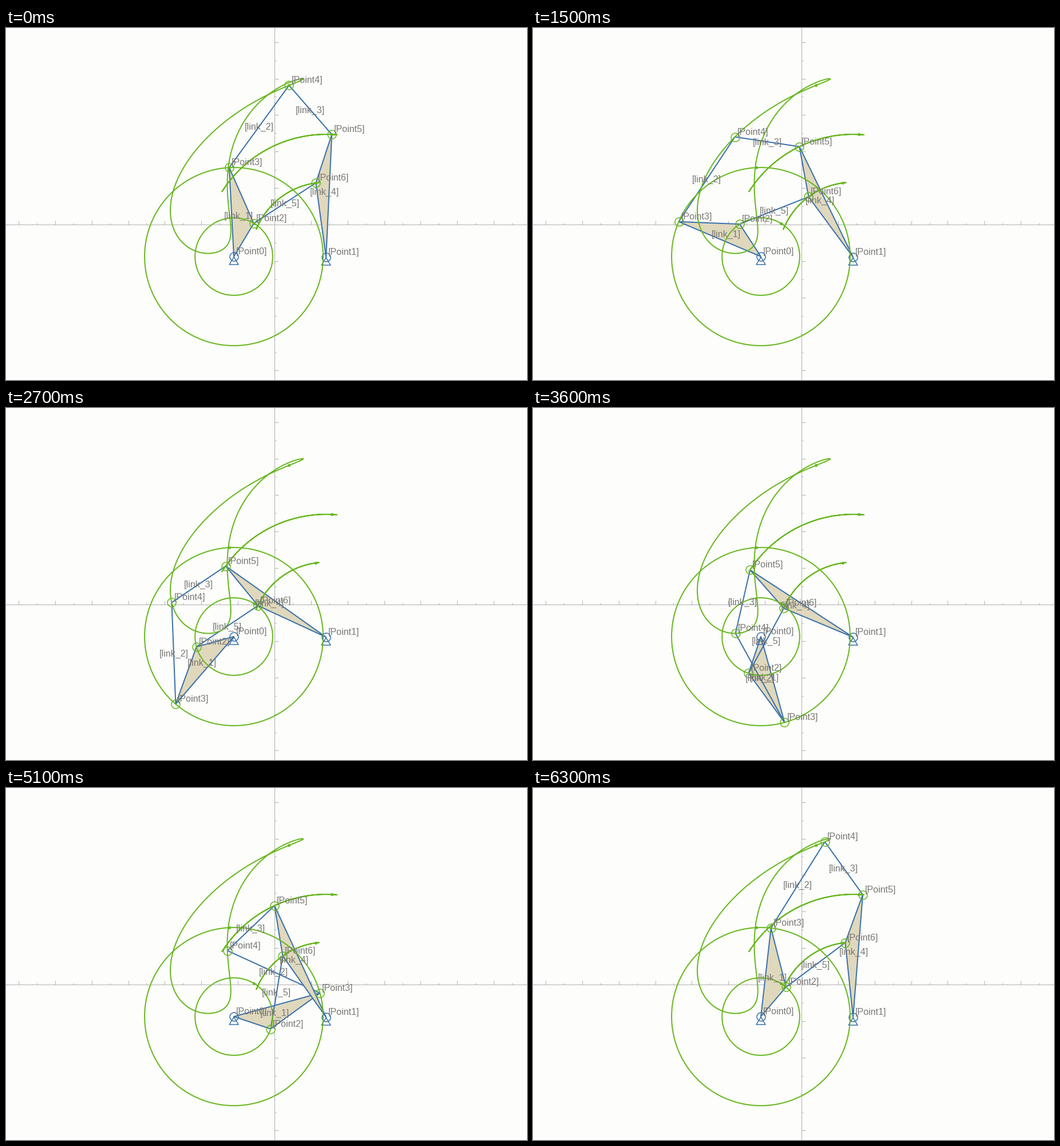
A matplotlib script for the animation above (6400 ms loop, 910 by 616 pixels).

```python
import numpy as np
import matplotlib.pyplot as plt
from matplotlib.animation import FuncAnimation

W, H, DPI = 910, 616, 100
FRAMES, STEP_MS = 64, 100
PX = 72 / DPI

BG = "#fdfdfb"
AXIS = "#b0b0ae"
GREEN = "#67b71e"
BLUE = "#3a71a9"
FILL = "#e0d8bc"
TEXT = "#787876"

# Linkage geometry in pixels and degrees
P0 = np.array([398.0, 400.0])
P1 = np.array([559.0, 401.0])
R2, R3, CRANK_GAP = 67.8, 155.9, 33.9
R6, R5, ROCKER_GAP = 131.1, 214.9, 10.5
L26, L34, L45 = 129.4, 177.9, 113.9
START = 59.1

# Crank angle over time: a short rest, a soft start, then a steady turn
TIMES = [0, 2, 5, 10, 20, 27, 36, 51, 63]
TURNS = [0, 0, 9, 33.5, 94.4, 136.3, 192.4, 282.3, 350.5]

LINKS = [(0, 2, 3), (3, 4), (4, 5), (1, 5, 6), (2, 6)]

# Keeps the arcs that are traced there and back at their true width
plt.rcParams["path.simplify"] = False


def polar(center, radius, deg):
    a = np.radians(deg)
    return center + radius * np.array([np.cos(a), -np.sin(a)])


def meet(a, ra, b, rb):
    """Meeting point of two circles, on the left going from a to b."""
    d = b - a
    dist = np.hypot(*d)
    u = d / dist
    along = (ra**2 - rb**2 + dist**2) / (2 * dist)
    off = np.sqrt(max(ra**2 - along**2, 0))
    return a + along * u + off * np.array([u[1], -u[0]])


def solve(turn):
    p2 = polar(P0, R2, START + turn)
    p3 = polar(P0, R3, START + CRANK_GAP + turn)
    p6 = meet(p2, L26, P1, R6)
    d = p6 - P1
    p5 = polar(P1, R5, np.degrees(np.arctan2(-d[1], d[0])) - ROCKER_GAP)
    p4 = meet(p3, L34, p5, L45)
    return np.array([P0, P1, p2, p3, p4, p5, p6])


fig = plt.figure(figsize=(W / DPI, H / DPI), dpi=DPI, facecolor=BG)
ax = fig.add_axes([0, 0, 1, 1])
ax.set_xlim(0, W)
ax.set_ylim(H, 0)
ax.axis("off")


def line(x, y, color, width, z, **kw):
    return ax.plot(x, y, color=color, lw=width * PX, zorder=z, **kw)[0]


def ring(p, color, z):
    return line([p[0]], [p[1]], "none", 0, z, marker="o", ms=15 * PX,
                mfc="none", mec=color, mew=1.5 * PX, snap=False)


def label(text, **kw):
    return ax.text(0, 0, text, family="Liberation Sans", fontsize=16 * PX,
                   color=TEXT, va="baseline", zorder=6, **kw)


def rule(x, y):
    line(x, y, AXIS, 1, 1, snap=False, solid_capstyle="butt")


def draw_axes():
    ox, oy, unit = 469.5, 344.5, 31.93
    rule([0, W], [oy, oy])
    rule([ox, ox], [0, H])
    for k in range(-14, 15):
        size = 3 if k % 2 else 7
        x = np.floor(ox + k * unit) + 0.5
        y = np.floor(oy + k * unit) + 0.5
        rule([x, x], [oy - size, oy])
        rule([ox, ox + size], [y, y])


def draw_paths():
    track = np.array([solve(t) for t in np.linspace(0, 360, 361)])
    for i in range(2, 7):
        x, y = track[:, i].T
        line(x, y, GREEN, 2, 4)
        line(x[:1], y[:1], GREEN, 0, 4, marker="o", ms=5 * PX, mew=0,
             snap=False)


def draw_base(p):
    x, y = p
    line([x, x - 8, x + 8, x], [y + 1, y + 14, y + 14, y + 1], BLUE, 1.5, 3)
    ring(p, BLUE, 3)


draw_axes()
draw_paths()
draw_base(P0)
draw_base(P1)

bodies = []
for link in LINKS:
    face = FILL if len(link) == 3 else "none"
    body = ax.fill([0] * len(link), [0] * len(link), fc=face, ec=BLUE,
                   lw=2 * PX, joinstyle="round", zorder=2)[0]
    bodies.append(body)
joints = [ring(P0, GREEN, 5) for _ in range(5)]
point_tags = [label(f"[Point{i}]") for i in range(7)]
link_tags = [label(f"[link_{i}]", ha="center") for i in range(1, 6)]


def draw(frame):
    pts = solve(np.interp(frame, TIMES, TURNS))
    for link, body, tag in zip(LINKS, bodies, link_tags):
        corners = pts[list(link)]
        body.set_xy(corners)
        x, y = corners.mean(axis=0)
        tag.set_position((x, y + 5.5))
    for joint, (x, y) in zip(joints, pts[2:]):
        joint.set_data([x], [y])
    for tag, (x, y) in zip(point_tags, pts):
        tag.set_position((x + 4, y - 4))
    return bodies + joints + point_tags + link_tags


def reset():
    return draw(0)


anim = FuncAnimation(fig, draw, frames=FRAMES, init_func=reset,
                     interval=STEP_MS, repeat=True, repeat_delay=0)
plt.show()
```
